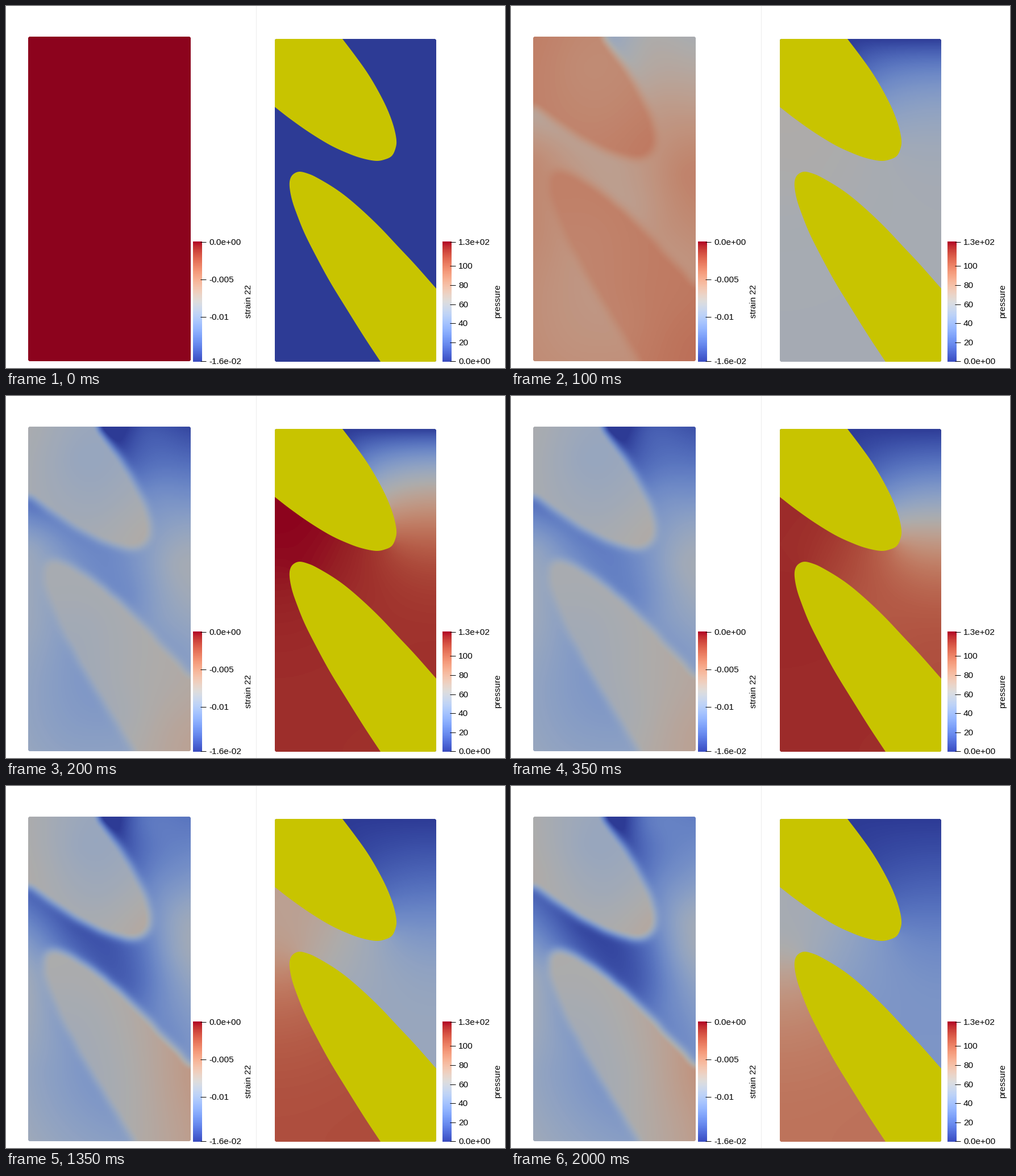
A matplotlib script that plays this animation: 878x638 px, repeating every 2.05 s.

```python
import numpy as np
import matplotlib.pyplot as plt
from matplotlib.animation import FuncAnimation
from matplotlib.colors import ListedColormap
from matplotlib.patches import Polygon
from matplotlib.path import Path

W, H, DPI = 878, 638, 100
FRAMES, STEP_MS, RAMP = 41, 50, 4
LEFT = (39, 54, 325, 626)
RIGHT = (473, 58, 757, 627)
YELLOW = "#c8c400"
coolwarm = plt.get_cmap("coolwarm")
shaded = ListedColormap(coolwarm(np.linspace(0, 1, 512))[:, :3] * 0.78)

UPPER = [(592, 58), (614, 87), (636, 118), (655, 150), (671, 182), (682, 212),
         (687, 237), (685, 252), (679, 264), (668, 270), (651, 273), (625, 268),
         (600, 259), (570, 245), (534, 223), (500, 199), (473, 178)]
LOWER = [(757, 498), (720, 456), (690, 424), (660, 392), (630, 363), (600, 337),
         (575, 319), (548, 303), (533, 296), (517, 292), (506, 296), (500, 305),
         (499, 319), (503, 341), (511, 365), (525, 400), (545, 440), (570, 486),
         (600, 535), (630, 583), (659, 627)]

# x, y, strain level (percent of the scale) when loaded, and after drainage
MATRIX = [(240, 57, 7, 19), (178, 62, -10, -10), (320, 57, 4, 21),
          (250, 110, 14, 18), (315, 110, 14, 25), (260, 175, 27, 25),
          (315, 175, 27, 33), (300, 235, 38, 40), (300, 295, 45, 38),
          (250, 290, 35, 19), (270, 390, 36, 23), (310, 445, 35, 27),
          (50, 200, 19, 11), (120, 250, 24, 4), (180, 300, 25, 4),
          (220, 350, 27, 9), (45, 270, 40, 27), (45, 330, 42, 41),
          (60, 400, 40, 40), (60, 500, 37, 38), (100, 600, 36, 38),
          (190, 610, 36, 34), (150, 540, 32, 31), (110, 465, 33, 33)]
INCLUSION = [(50, 60, 48, 49), (125, 110, 41, 42), (60, 150, 46, 50),
             (170, 190, 44, 45), (235, 240, 51, 53), (85, 320, 48, 50),
             (150, 400, 46, 48), (220, 500, 49, 51), (300, 590, 56, 59),
             (318, 510, 53, 64), (200, 560, 47, 49)]


def smooth(pts, n=6):
    """Catmull-Rom curve through the points."""
    p = np.array(pts, float)
    p = np.vstack([2 * p[0] - p[1], p, 2 * p[-1] - p[-2]])
    t = np.linspace(0, 1, n, endpoint=False)[:, None]
    out = []
    for a, b, c, d in zip(p, p[1:], p[2:], p[3:]):
        out.append(b + t * (c - a) / 2 + t**2 * (a - 2.5 * b + 2 * c - d / 2)
                   + t**3 * (1.5 * (b - c) + (d - a) / 2))
    return np.vstack(out + [p[-2:-1]])


def centres(box, nx, ny):
    x0, y0, x1, y1 = box
    xs = x0 + (np.arange(nx) + 0.5) * (x1 - x0) / nx
    ys = y0 + (np.arange(ny) + 0.5) * (y1 - y0) / ny
    return np.meshgrid(xs, ys)


def inside(x, y):
    pts = np.column_stack([x.ravel(), y.ravel()])
    hit = [Path(s).contains_points(pts) for s in shapes]
    return (hit[0] | hit[1]).reshape(x.shape)


shapes = [np.vstack([smooth(UPPER), [(473, 58)]]),
          np.vstack([smooth(LOWER), [(757, 627)]])]


def fill_dry(p, wet):
    """Carry pore pressure a little way under the inclusions."""
    val, known = p * wet, wet.astype(float)
    ny, nx = p.shape
    for _ in range(5):
        v, k = np.pad(val, 1), np.pad(known, 1)
        near = [(slice(i, i + ny), slice(j, j + nx))
                for i in range(3) for j in range(3)]
        total, count = sum(v[s] for s in near), sum(k[s] for s in near)
        new = (known == 0) & (count > 0)
        val[new] = total[new] / count[new]
        known[new] = 1
    return val


def pressure_fields(nx=48, ny=96, diffusivity=4600, sub=600):
    """Ramp loading, then drainage through the top edge."""
    x, y = centres(RIGHT, nx, ny)
    wet = ~inside(x, y)
    cell = (RIGHT[2] - RIGHT[0]) / nx
    k = diffusivity / cell**2 / sub
    gx = k * (wet[:, 1:] & wet[:, :-1])
    gy = k * (wet[1:] & wet[:-1])
    top = 2 * k * wet[0]
    load = 0.234 + 0.03 * np.exp(-((x - 530)**2 + (y - 235)**2) / 2 / 70**2)
    load = load * wet / sub
    p = np.zeros((ny, nx))
    fields = [p.copy()]
    for n in range(1, FRAMES):
        for _ in range(sub):
            fx = gx * (p[:, 1:] - p[:, :-1])
            fy = gy * (p[1:] - p[:-1])
            p[0] -= top * p[0]
            p[:, 1:] -= fx
            p[:, :-1] += fx
            p[1:] -= fy
            p[:-1] += fy
            if n <= RAMP:
                p += load
        fields.append(fill_dry(p, wet))
    return fields


def thin_plate(rows, x, y):
    """Thin-plate spline through the sample rows, for both value columns."""
    a = np.array(rows, float)
    px, py, vals = a[:, 0] / 100, a[:, 1] / 100, a[:, 2:] / 100

    def kernel(u, v):
        r2 = (u[:, None] - px)**2 + (v[:, None] - py)**2
        return r2 * np.log(r2 + 1e-9)

    def linear(u, v):
        return np.column_stack([np.ones_like(u), u, v])

    m = len(a)
    q = linear(px, py)
    system = np.block([[kernel(px, py) + 0.02 * np.eye(m), q],
                       [q.T, np.zeros((3, 3))]])
    coef = np.linalg.solve(system, np.vstack([vals, np.zeros((3, 2))]))
    u, v = x.ravel() / 100, y.ravel() / 100
    out = np.hstack([kernel(u, v), linear(u, v)]) @ coef
    return out.T.reshape(2, *x.shape)


def blur(f, sigma):
    r = int(3 * sigma) + 1
    g = np.exp(-np.arange(-r, r + 1)**2 / 2 / sigma**2)
    g /= g.sum()
    f = np.pad(f, r, mode="edge")
    for axis in (0, 1):
        f = np.apply_along_axis(np.convolve, axis, f, g, "valid")
    return f


def strain_states(nx=72, ny=143):
    x, y = centres(LEFT, nx, ny)
    xr, yr = centres(RIGHT, nx, ny)
    soft = blur(inside(xr, yr).astype(float), 1.9)
    soft = np.clip(soft * 1.12, 0, 1)
    return thin_plate(MATRIX, x, y) * (1 - soft) + thin_plate(INCLUSION, x, y) * soft


pressure = pressure_fields()
loaded, drained = strain_states()


def strain(n):
    if n <= RAMP:
        return 1 - (1 - loaded) * (n / RAMP)**0.9
    w = (1 - np.exp((RAMP - n) / 20)) / (1 - np.exp((RAMP - FRAMES + 1) / 20))
    return loaded + (drained - loaded) * w


plt.rcParams["font.family"] = "Liberation Sans"
# the small margin keeps the pixel size from rounding down
fig = plt.figure(figsize=((W + 0.01) / DPI, (H + 0.01) / DPI), dpi=DPI,
                 facecolor="white")
ax = fig.add_axes([0, 0, 1, 1])


def panel(box, data):
    x0, y0, x1, y1 = box
    im = ax.imshow(data, cmap=shaded, vmin=0, vmax=1, interpolation="bilinear",
                   extent=(x0, x1, y1, y0), aspect="auto", zorder=1)
    edge = Polygon([(x0, y0 + 2), (x0 + 2, y0), (x1 - 2, y0), (x1, y0 + 2),
                    (x1, y1 - 2), (x1 - 2, y1), (x0 + 2, y1), (x0, y1 - 2)],
                   transform=ax.transData)
    im.set_clip_path(edge)
    return im, edge


def label(x, y, s, **kw):
    ax.text(x, y, s, fontsize=15.4 * 72 / DPI, color="black", **kw)


def colorbar(x, ticks, title, title_x):
    ax.imshow(np.linspace(1, 0, 256)[:, None], cmap=coolwarm, aspect="auto",
              extent=(x, x + 15, 627, 416), interpolation="bilinear")
    for y, s in ticks:
        ax.plot([x + 13, x + 23], [y + 0.5] * 2, color="black", lw=0.72,
                solid_capstyle="butt")
        label(x + 28, y + 4.5, s, va="baseline")
    label(title_x, 520, title, rotation=90, rotation_mode="anchor",
          ha="center", va="baseline")


left_im, _ = panel(LEFT, strain(0))
right_im, right_edge = panel(RIGHT, pressure[0])
for s in shapes:
    body = ax.add_patch(Polygon(s, fc=YELLOW, ec="none", zorder=2))
    body.set_clip_path(right_edge)
ax.plot([439.5, 439.5], [0, H], color="#ececec", lw=0.72, zorder=0)
colorbar(329, [(416, "0.0e+00"), (482, "-0.005"), (548, "-0.01"),
               (626, "-1.6e-02")], "strain 22", 431)
colorbar(768, [(416, "1.3e+02"), (458, "100"), (492, "80"), (526, "60"),
               (559, "40"), (593, "20"), (626, "0.0e+00")], "pressure", 869)
ax.set_xlim(0, W)
ax.set_ylim(H, 0)
ax.axis("off")


def update(n):
    left_im.set_data(strain(n))
    right_im.set_data(pressure[n])
    return left_im, right_im


anim = FuncAnimation(fig, update, frames=FRAMES, interval=STEP_MS,
                     repeat=True, repeat_delay=0, blit=False)
plt.show()
```
